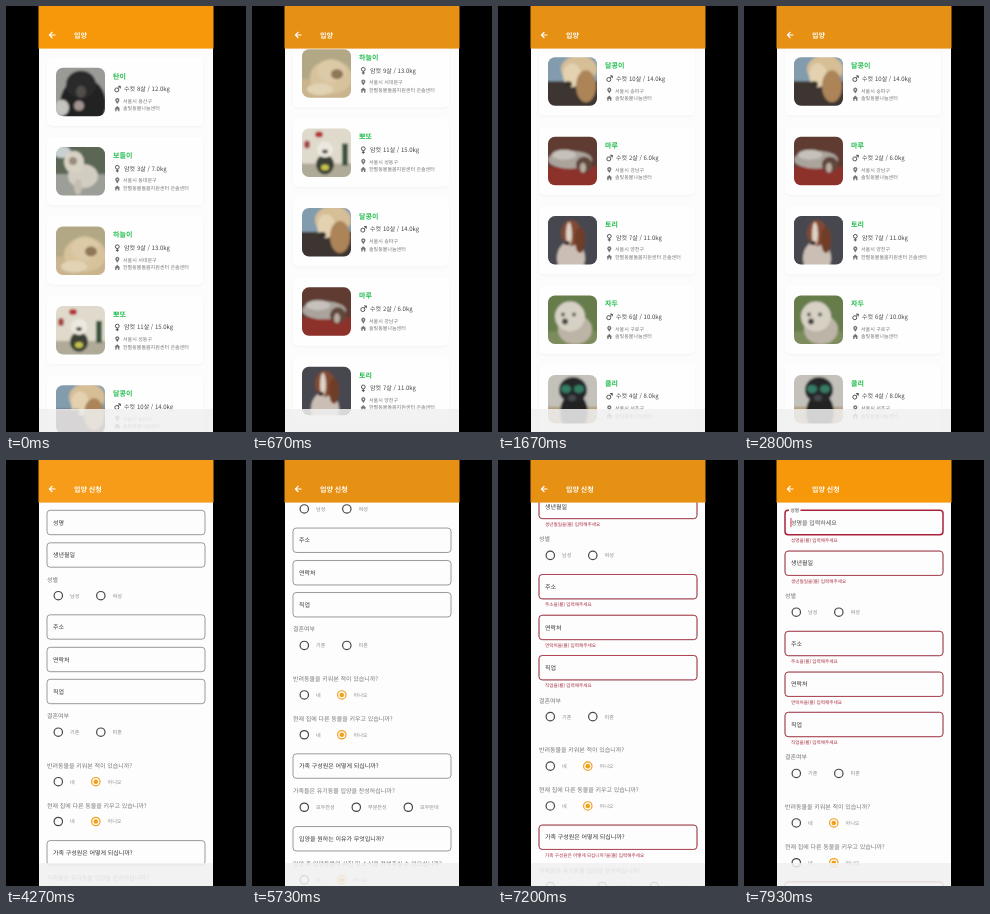
Animation of 240x426 px, one loop 8000 ms. Source, as an HTML page:

```html
<!DOCTYPE html>
<html lang="ko">
<head>
<meta charset="utf-8">
<style>
html, body { margin: 0; width: 100%; height: 100%; overflow: hidden; background: #000; }
svg { display: block; width: 100vw; height: 100vh; }
text { font-family: "Noto Sans CJK KR", "Noto Sans CJK", "Noto Sans CJK JP", sans-serif; text-rendering: geometricPrecision; white-space: pre; }
.card { fill: #fefefe; filter: drop-shadow(0 1px 1px #0000000a); }
.line { fill: none; stroke: #444; stroke-width: .9; }
</style>
</head>
<body>
<svg viewBox="0 0 240 426">
  <defs>
    <clipPath id="screen"><rect x="33" width="174" height="426"/></clipPath>
    <clipPath id="photo"><rect width="49" height="48.5" rx="7"/></clipPath>
    <filter id="soft"><feGaussianBlur stdDeviation="1.1"/></filter>
  </defs>
  <g clip-path="url(#screen)">
    <rect x="33" width="174" height="426" fill="#fcfcfc"/>
    <g id="list"></g>
    <g id="formPage">
      <rect x="33" width="174" height="426" fill="#fdfdfd"/>
      <g id="form"></g>
      <g id="errorForm"></g>
    </g>
    <rect x="33" y="403" width="174" height="23" fill="#f0f0f0" opacity=".86"/>
  </g>
  <rect id="header" x="32.5" width="175" height="42.6"/>
  <path d="M49.5 29H43.6M46.4 26l-3 3 3 3" fill="none" stroke="#fff" stroke-width="1.1"/>
  <text id="title" x="68" y="31.6" font-size="7" font-weight="700" fill="#fff"></text>
</svg>
<script>
const $ = id => document.getElementById(id);
const clamp = x => Math.max(0, Math.min(1, x));
const progress = (t, from, to) => clamp((t - from) / (to - from));
const smooth = x => x * x * (3 - 2 * x);

// Text whose glyphs are centred on y.
const text = (x, y, size, fill, content, weight = 400) =>
  `<text x="${x}" y="${y + size * .37}" font-size="${size}" fill="${fill}" font-weight="${weight}">${content}</text>`;
const blob = (x, y, rx, ry, fill) => `<ellipse cx="${x}" cy="${y}" rx="${rx}" ry="${ry}" fill="${fill}"/>`;
const block = (x, y, w, h, fill) => `<rect x="${x}" y="${y}" width="${w}" height="${h}" fill="${fill}"/>`;
// Backdrop that bleeds past the photo edges, from y downwards.
const ground = (fill, y = -9) => block(-9, y, 67, 70, fill);

// --- adoption list ---
const photos = [
  ground('#9a9b97') + blob(27, 36, 23, 26, '#222224') + blob(25, 17, 15, 14, '#2a2a2c') +
    blob(25, 24, 5, 6, '#514e4c') + blob(23, 38, 5, 5, '#a1938f') + blob(6, 40, 7, 8, '#c4c3c0'),
  ground('#5c6654') + ground('#9c9f98', 27) + blob(6, 5, 9, 6, '#c9d0d0') + blob(27, 29, 15, 12, '#d2cdc0') +
    blob(18, 15, 10, 11, '#d8d2c4') + blob(17, 14, 4, 4, '#978c7c') + blob(22, 40, 4, 8, '#c4beb0'),
  ground('#b3a886') + ground('#c9b48d', 30) + blob(29, 28, 21, 17, '#d7c29b') +
    blob(29, 22, 14, 12, '#dcc9a5') + blob(35, 25, 6, 5, '#8f7759') + blob(18, 40, 13, 6, '#e2d3b5'),
  ground('#dfdacb') + ground('#b0aa98', 35) + blob(17, 6, 4, 3, '#b4343a') +
    blob(5, 16, 3, 4, '#a8474a') + block(40, 15, 6, 22, '#3a5540') + blob(23, 36, 9, 10, '#3b4034') +
    blob(23, 21, 8, 8, '#ede8df') + blob(23, 23, 3, 2, '#55504b') + blob(23, 39, 4, 3, '#c5c24e'),
  ground('#829cad') + ground('#3c3632', 24) + blob(31, 12, 18, 14, '#d6be96') +
    blob(24, 18, 9, 12, '#e3d1b0') + blob(38, 29, 10, 16, '#ac8459') + blob(20, 27, 4, 3, '#38302b'),
  ground('#5f3b32') + ground('#8d322c', 30) + blob(22, 23, 22, 9, '#aaa49d') +
    blob(16, 18, 12, 5, '#c6c1ba') + blob(36, 28, 8, 8, '#5f463b') + blob(35, 31, 3, 5, '#b9aa9f'),
  ground('#464650') + blob(23, 42, 14, 17, '#cbbfb5') + blob(23, 17, 10, 13, '#824a32') +
    blob(32, 24, 5, 13, '#703d28') + blob(21, 18, 3, 12, '#dfd2c6') + blob(19, 27, 3, 2, '#352a28'),
  ground('#667d4c') + ground('#7c8c5b', 36) + blob(27, 34, 17, 15, '#bcb4a6') +
    blob(22, 21, 15, 15, '#d7d1c5') + blob(17, 26, 3, 3, '#4a4542') + blob(15, 19, 2, 2, '#605a55') + blob(26, 19, 2, 2, '#605a55'),
  ground('#c3c1ba') + ground('#b39c7c', 32) + blob(26, 38, 14, 20, '#202123') + blob(25, 15, 14, 13, '#26282a') +
    blob(18, 14, 5, 4, '#347c65') + blob(31, 14, 5, 4, '#347c65') + blob(24, 23, 4, 3, '#44484a')
];
const shelters = { a: '솔빛동물나눔센터', b: '한별동물돌봄지원센터 은솔센터' };
const dogs = [
  ['탄이', '수컷', 8, '12.0', '용산구', 'a'],
  ['보들이', '암컷', 3, '7.0', '동대문구', 'b'],
  ['하늘이', '암컷', 9, '13.0', '서대문구', 'b'],
  ['뽀또', '암컷', 11, '15.0', '성동구', 'b'],
  ['달콩이', '수컷', 10, '14.0', '송파구', 'a'],
  ['마루', '수컷', 2, '6.0', '강남구', 'a'],
  ['토리', '암컷', 7, '11.0', '양천구', 'b'],
  ['자두', '수컷', 6, '10.0', '구로구', 'a'],
  ['쿨리', '수컷', 4, '8.0', '서초구', 'a']
];
const genderIcons = {
  수컷: '<path class="line" d="M112.3 82.3l2-2m-2.2 0h2.2v2.2"/><circle class="line" cx="110.8" cy="83.9" r="2"/>',
  암컷: '<path class="line" d="M111.3 83.8v3.2m-1.5-1.5h3"/><circle class="line" cx="111.3" cy="81.9" r="1.9"/>'
};
const pin = '<path d="M111.3 98l-1.7-2.6a2.1 2.1 0 1 1 3.4 0z" fill="#777"/><circle cx="111.3" cy="94.2" r=".7" fill="#fff"/>';
const house = '<path d="M108.5 102.6l2.8-2.6 2.8 2.6h-.7v2.6h-1.4v-1.8h-1.4v1.8h-1.4v-2.6z" fill="#777"/>';

$('list').innerHTML = dogs.map(([name, gender, age, weight, district, shelter], i) =>
  `<g transform="translate(0 ${i * 79.4})">
    <rect class="card" x="41" y="51.5" width="156" height="68.5" rx="5"/>
    <g transform="translate(50 61.7)" clip-path="url(#photo)"><g filter="url(#soft)">${photos[i]}</g></g>
    ${text(107, 70, 7, '#21bd4d', name, 700)}
    ${genderIcons[gender]}${text(118, 83, 6, '#444', gender, 500)}${text(131, 83, 6, '#444', `${age}살 / ${weight}kg`, 500)}
    ${pin}${text(117, 95.2, 5, '#777', '서울시 ' + district)}
    ${house}${text(117, 102.6, 5, '#777', shelters[shelter])}
  </g>`).join('');

// --- application form ---
const yesNo = ['네', '아니오'];
const rows = [
  [62.5, '성명'],
  [95, '생년월일'],
  [119.5, '성별', ['남성', '여성']],
  [167, '주소'],
  [199.5, '연락처'],
  [231.5, '직업'],
  [256, '결혼여부', ['기혼', '미혼']],
  [305.5, '반려동물을 키워본 적이 있습니까?', yesNo],
  [345.3, '현재 집에 다른 동물을 키우고 있습니까?', yesNo],
  [392.8, '가족 구성원은 어떻게 되십니까?'],
  [417.8, '가족들은 유기동물 입양을 찬성하십니까?', ['모두찬성', '부분찬성', '모두반대']],
  [465.5, '입양을 원하는 이유가 무엇입니까?'],
  [490.4, '입양 후 입양동물의 사진 및 소식을 전해주실 수 있으십니까?', yesNo],
  [530.2, '반려동물이 자연사할 때까지 끝을 지켜주실 수 있습니까?', yesNo],
  [569.9, '반려동물의 불임 수술 시행에 동의하십니까?', yesNo],
  [609.5, '입양 시 반려동물에 대한 책임과 납부에 동의하십니까?', yesNo]
];

const box = (y, color, width, cls = '') =>
  `<rect class="${cls}" x="41" y="${y - 12.2}" width="158" height="24.4" rx="3.2" fill="none" stroke="${color}" stroke-width="${width}"/>`;

function radios(y, options) {
  const step = options.length === 3 ? 52 : options === yesNo ? 37.5 : 42.5;
  return options.map((label, i) => {
    const x = 52.3 + i * step;
    const on = options === yesNo && i === 1;
    const color = on ? '#f2a01c' : '#484848';
    return `<circle cx="${x}" cy="${y}" r="4.2" fill="none" stroke="${color}" stroke-width="1.2"/>` +
      (on ? `<circle cx="${x}" cy="${y}" r="2.3" fill="${color}"/>` : '') +
      text(x + 11.7, y, 5.1, '#888', label);
  }).join('');
}

function buildForm(withErrors) {
  let shift = 0;
  return rows.map(([base, label, options], i) => {
    const y = base + shift;
    if (options) return text(41, y, 6, '#777', label) + radios(y + 16.2, options);
    if (!withErrors) return box(y, '#808080', .8) + text(47, y, 6, '#333', label);
    shift += 8.25;
    const idle = box(y, '#999', .8) + box(y, '#b0394a', .9, 'error') + text(47, y, 6, '#333', label);
    const focused = box(y, '#a8233a', 1.5) + block(45, y - 14, 11.5, 4, '#fdfdfd') +
      text(46.5, y - 12.2, 4.6, '#333', label) + text(47, y, 6, '#555', label + '을 입력하세요') +
      block(46.5, y - 4.5, .9, 9, '#d0283c');
    const field = i ? idle : `<g id="idleName">${idle}</g><g id="focusedName">${focused}</g>`;
    return field + `<g class="error">${text(47, y + 17.6, 4.6, '#a82c40', label + '을(를) 입력해주세요')}</g>`;
  }).join('');
}
$('form').innerHTML = buildForm(false);
$('errorForm').innerHTML = buildForm(true);
const errors = document.querySelectorAll('.error');

// --- timeline ---
const show = (id, visible) => $(id).setAttribute('visibility', visible ? 'visible' : 'hidden');
const moveUp = (id, y) => $(id).setAttribute('transform', `translate(0 ${-y})`);

function headerColor(t) {
  if (t < 330 || t >= 7270) return '#f6980a';
  if (t >= 3400 && t < 5530) return '#f69c18';
  return '#e69113';
}

function draw(t) {
  moveUp('list', 328 * (1 - (1 - progress(t, 70, 1570)) ** 1.52));

  const enter = smooth(progress(t, 3400, 3700));
  moveUp('formPage', 30 * (enter - 1));
  $('formPage').setAttribute('opacity', enter);

  const submitted = t >= 6330;
  const focused = t >= 7600;
  const scroll = 300 * (smooth(progress(t, 5500, 6150)) - smooth(progress(t, 6400, 7510)));
  moveUp('form', scroll);
  moveUp('errorForm', scroll);
  $('form').style.display = submitted ? 'none' : '';
  $('errorForm').style.display = submitted ? '' : 'none';
  show('idleName', !focused);
  show('focusedName', focused);
  errors.forEach(e => e.setAttribute('opacity', progress(t, 6330, 6800)));

  $('header').setAttribute('fill', headerColor(t));
  $('title').textContent = t < 3400 ? '입양' : '입양 신청';
}

const start = performance.now();
(function frame() {
  draw((performance.now() - start) % 8000);
  requestAnimationFrame(frame);
})();
</script>
</body>
</html>
```
